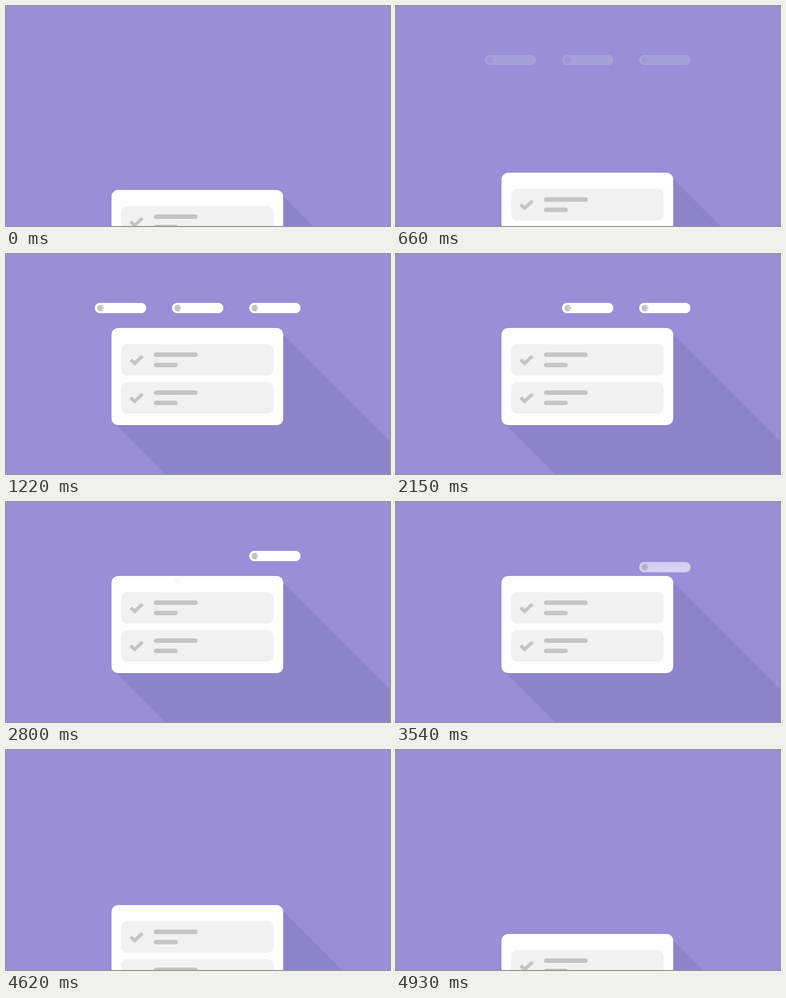
An HTML page for the animation above (5120 ms loop, 597 px wide and 342 px high).

```html
<!DOCTYPE html>
<html lang="en">
<head>
<meta charset="utf-8">
<title>Checklist card</title>
<style>
  html, body { margin: 0; width: 100%; height: 100%; overflow: hidden; background: #998ed7; }
  svg { display: block; width: 597px; height: 342px; }

  .card, .pill, .check { animation: 5120ms linear infinite; }

  .card { animation-name: slide; }
  .shadow { fill: #8d83c8; }
  .row { fill: #f1f1f1; }
  .bar, .dot { fill: #c4c4c4; }
  .check { fill: none; stroke: #c4c4c4; stroke-width: 5.2; animation-name: tick; }

  .pill { fill: #fff; opacity: 0; }
  .pill text { font: bold 8px Roboto, Arial, sans-serif; text-anchor: middle; }
  .p1 { animation-name: drop1; }
  .p2 { animation-name: drop2; }
  .p3 { animation-name: drop3; }

  /* The card rises, waits for the pills, then sinks. */
  @keyframes slide {
    0%, 11.78% { transform: translateY(286px); animation-timing-function: ease-out; }
    23.4%, 83.14% { transform: translateY(115px); animation-timing-function: ease-out; }
    96.05%, 100% { transform: translateY(286px); }
  }

  /* Every pill that lands turns the ticks green again. */
  @keyframes tick {
    0%, 29.63% { stroke: #c4c4c4; animation-timing-function: ease; }
    40.76%, 47.85% { stroke: #d4e76e; }
    47.86% { stroke: #c4c4c4; animation-timing-function: ease; }
    58.98%, 66.4% { stroke: #d4e76e; }
    66.41% { stroke: #c4c4c4; animation-timing-function: ease; }
    77.54%, 83.14% { stroke: #d4e76e; animation-timing-function: ease-out; }
    96.05%, 100% { stroke: #c4c4c4; }
  }

  @keyframes drop1 {
    0%, 11.78% { opacity: 0; transform: none; animation-timing-function: ease-out; }
    23.4%, 29.63% { opacity: 1; transform: none; animation-timing-function: ease; }
    40.76%, 100% { opacity: 0; transform: translate(33px, 43px); }
  }
  @keyframes drop2 {
    0%, 11.78% { opacity: 0; transform: none; animation-timing-function: ease-out; }
    23.4%, 47.85% { opacity: 1; transform: none; animation-timing-function: ease; }
    58.98%, 100% { opacity: 0; transform: translateY(43px); }
  }
  @keyframes drop3 {
    0%, 11.78% { opacity: 0; transform: none; animation-timing-function: ease-out; }
    23.4%, 66.41% { opacity: 1; transform: none; animation-timing-function: ease; }
    77.54%, 100% { opacity: 0; transform: translateY(43px); }
  }
</style>
</head>
<body>
<svg viewBox="0 0 597 342">
  <defs>
    <g id="item">
      <rect class="row" x="179" width="237" height="49" rx="9"/>
      <rect class="bar" x="230" y="13" width="68" height="7" rx="3.5"/>
      <rect class="bar" x="230" y="29" width="37" height="7" rx="3.5"/>
      <path class="check" d="M193.7 24.2 L200.2 30 L212.2 18.6"/>
    </g>
    <g id="tag">
      <rect width="80" height="16" rx="8"/>
      <circle class="dot" cx="9" cy="8" r="5.2"/>
      <text x="9" y="11">?</text>
    </g>
  </defs>

  <g class="card">
    <path class="shadow" d="M425 4 L725 303.5 V449 H469 L169.5 149 Z"/>
    <rect x="164" width="267" height="151" rx="10" fill="#fff"/>
    <use href="#item" y="25"/>
    <use href="#item" y="84"/>
  </g>

  <g class="pill p1"><use href="#tag" x="138" y="76"/></g>
  <g class="pill p2"><use href="#tag" x="258" y="76"/></g>
  <g class="pill p3"><use href="#tag" x="378" y="76"/></g>
</svg>
</body>
</html>
```
